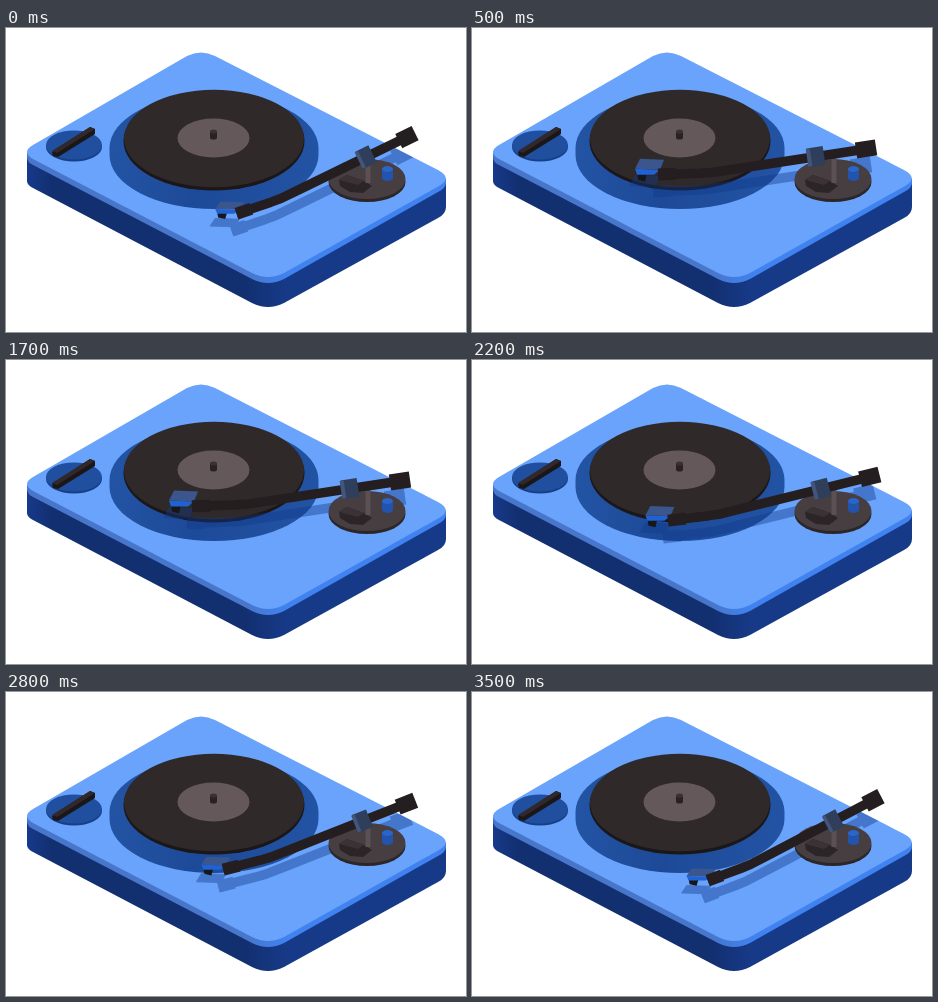
An HTML page that plays this animation: 460x304 px, repeating every 3600 ms.

```html
<!DOCTYPE html>
<html lang="en">
<head>
<meta charset="utf-8">
<title>Turntable</title>
<style>
  html, body { margin: 0; width: 100%; height: 100%; overflow: hidden; background: #fff; }
  svg { display: block; width: 460px; height: 304px; }
  polyline { fill: none; stroke-linejoin: round; }
</style>
</head>
<body>
<svg viewBox="0 0 460 304">
  <defs>
    <linearGradient id="side" x1="21" x2="440" y1="0" y2="0" gradientUnits="userSpaceOnUse">
      <stop offset="0" stop-color="#17398a"/>
      <stop offset=".06" stop-color="#122f70"/>
      <stop offset=".52" stop-color="#122f70"/>
      <stop offset=".62" stop-color="#173a88"/>
      <stop offset="1" stop-color="#173a88"/>
    </linearGradient>
    <linearGradient id="lip" x1="21" x2="440" y1="0" y2="0" gradientUnits="userSpaceOnUse">
      <stop offset="0" stop-color="#4876ca"/>
      <stop offset=".52" stop-color="#4876ca"/>
      <stop offset=".62" stop-color="#3f82f0"/>
      <stop offset="1" stop-color="#3f82f0"/>
    </linearGradient>
    <linearGradient id="cone" x1="103" x2="312" y1="110" y2="150" gradientUnits="userSpaceOnUse">
      <stop offset="0" stop-color="#2354a4"/>
      <stop offset=".45" stop-color="#1d4a98"/>
      <stop offset="1" stop-color="#2353a4"/>
    </linearGradient>
    <path id="top" d="M181 28Q195 21 209 28L432 142Q447 150 433 158L278 245Q262 253 246 245L27 131Q15 124 27 117Z"/>
    <clipPath id="deck"><use href="#top"/></clipPath>
    <!-- positions set by the script, colours by each use -->
    <polyline id="arm" stroke-width="9.500"/>
    <polyline id="collar" stroke-width="12"/>
    <polyline id="weight" stroke-width="16"/>
    <polyline id="clamp" stroke-width="19"/>
    <polyline id="clampEdge" stroke-width="18"/>
    <g id="rod"><use href="#arm"/><use href="#collar"/><use href="#weight"/></g>
    <polygon id="plate" points="-14,5 -9,-5 15,-4 11,6"/>
  </defs>

  <!-- deck -->
  <path fill="url(#side)" d="M21 128V153Q21 157 27 160L246 275Q262 283 278 275L432 190Q440 186 440 179V152L262 250Z"/>
  <path fill="url(#lip)" d="M21 124V129Q21 134 27 137L246 251Q262 259 278 251L432 164Q440 160 440 155V150L262 244Z"/>
  <use href="#top" fill="#69a3fb"/>

  <!-- knob -->
  <path fill="#183f85" d="M40 117V119A28 14.500 0 0 0 96 119V117Z"/>
  <ellipse cx="68" cy="117" rx="28" ry="14.500" fill="#1f4f9e"/>
  <path fill="#1b1618" d="M46 124L84 99L89 101V106L52 129L47 128Z"/>
  <path fill="#30282b" d="M46 123L84 99L89 101L51 125Z"/>

  <!-- platter and record -->
  <path fill="url(#cone)" d="M103.500 120A104.500 54 0 0 1 312.500 120V127A104.500 54 0 0 1 103.500 127Z"/>
  <ellipse cx="208" cy="113" rx="90.500" ry="49.500" fill="#1b1718"/>
  <ellipse cx="208" cy="110.500" rx="90" ry="48.800" fill="#2f2929"/>
  <g clip-path="url(#deck)">
    <g opacity=".42" transform="translate(-5 17)" fill="#123b8a" stroke="#123b8a">
      <use href="#rod"/>
      <use class="head" href="#plate"/>
    </g>
  </g>
  <ellipse cx="207.500" cy="110" rx="36" ry="19.500" fill="#64585a"/>
  <path fill="#292123" d="M204 104V109.500A3.500 2 0 0 0 211 109.500V104Z"/>
  <ellipse cx="207.500" cy="103.500" rx="3.500" ry="2" fill="#3a3134"/>

  <!-- arm base -->
  <ellipse cx="361" cy="154" rx="38.500" ry="20" fill="#2c2628"/>
  <ellipse cx="361" cy="151" rx="38.500" ry="20" fill="#463e41"/>
  <path fill="#2c2528" d="M333 152L341 147L358 153L366 158L357 165L344 164L334 158Z"/>
  <path fill="#3a3235" d="M333 152L341 147L358 153L352 157Z"/>
  <path fill="#5b5053" d="M359.500 128H364.500V155H359.500Z"/>
  <path fill="#2253ad" d="M376 141V150A5.500 3 0 0 0 387 150V141Z"/>
  <ellipse cx="381.500" cy="141" rx="5.500" ry="3" fill="#2c65c8"/>

  <!-- tonearm -->
  <g class="head">
    <polygon fill="#171719" points="-12,9 -2,9 -4,18 -11,16"/>
    <polygon fill="#1f62d5" points="-14,5 11,6 5,11 -12,11"/>
    <use href="#plate" fill="#3a568c"/>
  </g>
  <use href="#rod" stroke="#241e20"/>
  <use href="#clamp" stroke="#2f3f5b"/>
  <use href="#clampEdge" stroke="#43557a"/>
</svg>
<script>
const LOOP = 3600, STEP = 100, TURN = 0.6;
const PIVOT = { x: 362, y: 112.6 }, TILT = 0.54;

// Stretches of the arm, measured from the pivot: counterweight positive, head negative.
const spans = {
  arm: [24, -94, -122, -134, -176],
  collar: [-158, -176],
  weight: [22, 42],
  clamp: [-26, -10],
  clampEdge: [-27, -23]
};

const nodes = Object.entries(spans).map(([id, xs]) => [document.getElementById(id), xs]);
const heads = document.querySelectorAll(".head");
const clamp01 = u => Math.min(1, Math.max(0, u));
const smooth = u => u * u * (3 - 2 * u);

// 0 = playing, 1 = fully swung out
function swing(t) {
  if (t < 600) return 1 - smooth(clamp01((t + 100) / 620));
  return 1 - (1 - clamp01((t - 1800) / 1700)) ** 1.5;
}

// Screen place of a point on the arm, turned about the pivot and raised on the way out.
function place(x, p) {
  const c = Math.cos(TURN * p), s = Math.sin(TURN * p);
  const side = 24 - 0.055 * x;
  const sag = Math.min(0.3 - 0.122 * x, 15.5);
  const lift = Math.sin(p * Math.PI / 2) * (2 - 0.035 * x);
  return [PIVOT.x + x * c + side * s, PIVOT.y + TILT * (side * c - x * s) + sag - lift];
}

function draw(p) {
  for (const [el, xs] of nodes) el.setAttribute("points", xs.map(x => place(x, p)).join(" "));
  const [x, y] = place(-185, p);
  for (const el of heads) el.setAttribute("transform", `translate(${x} ${y - 11}) scale(1 ${1 - 0.25 * p})`);
}

const start = performance.now();
function frame() {
  const t = (performance.now() - start) % LOOP;
  draw(swing(Math.floor(t / STEP) * STEP));
  requestAnimationFrame(frame);
}
frame();
</script>
</body>
</html>
```
